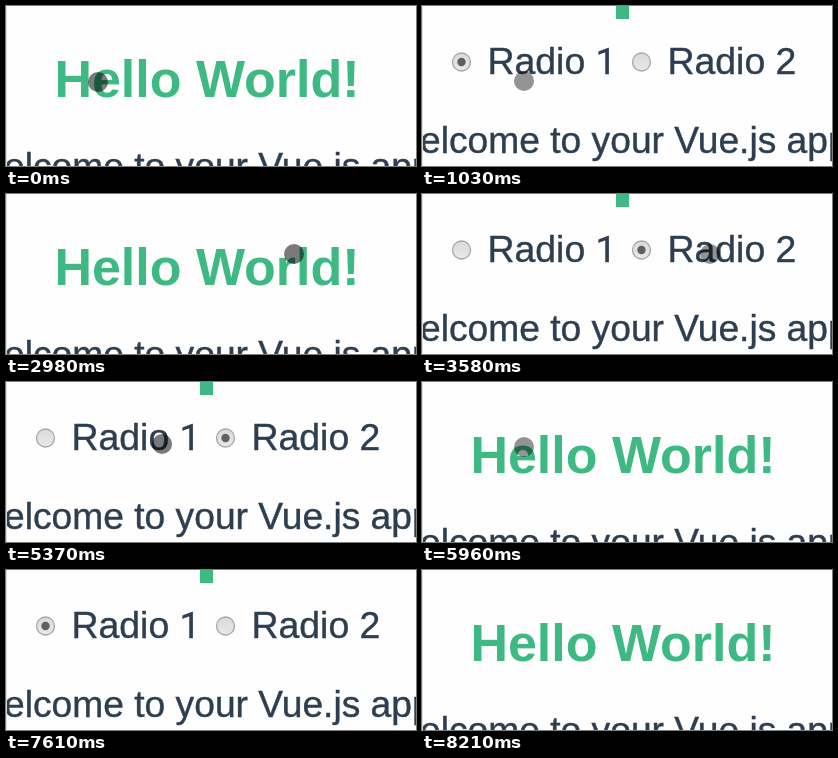
Write an HTML page that moves like this. It is 410x160 px and loops after 8630 ms.

```html
<!DOCTYPE html>
<html lang="en">
<head>
<meta charset="utf-8">
<title>Radio toggle</title>
<style>
  html, body { margin: 0; width: 100%; height: 100%; overflow: hidden; background: #fefefe; }
  svg { display: block; width: 410px; height: 160px; }
  text { font-family: "Liberation Sans", Arial, sans-serif; font-size: 37.4px; fill: #2c3e50; stroke: #2c3e50; stroke-width: .4px; }
  .title { font-size: 52px; font-weight: bold; fill: #3eb983; stroke: none; }
  .one { font-family: Roboto, sans-serif; }
  .mid { text-anchor: middle; }
  #welcome { font-size: 37.2px; }
</style>
</head>
<body>
<svg viewBox="0 0 410 160">
  <defs>
    <linearGradient id="face" x1="0" y1="0" x2="0" y2="1">
      <stop offset="0" stop-color="#dadada"/>
      <stop offset="1" stop-color="#e8e8e8"/>
    </linearGradient>
  </defs>
  <rect width="410" height="160" fill="#fefefe"/>
  <text id="title" class="title mid" x="201" y="91">Hello World!</text>
  <g id="form">
    <rect x="194" width="13" height="13" fill="#3eb983"/>
    <g fill="url(#face)" stroke="#a6a6a6" stroke-width="1.3">
      <circle cx="39.5" cy="56" r="9"/>
      <circle cx="219.5" cy="56" r="9"/>
    </g>
    <circle id="dot" cy="56" r="4.2" fill="#606060"/>
    <text x="65.5" y="67.5">Radio <tspan class="one">1</tspan></text>
    <text x="245.5" y="67.5">Radio 2</text>
  </g>
  <text id="welcome" class="mid" x="200.3">Welcome to your Vue.js app!</text>
  <rect width="1" height="160" fill="#dcdcdc"/>
  <circle id="pointer" r="10"/>
</svg>
<script>
const LOOP = 8630, STEP = 148.8, GONE = 7610;
const $ = id => document.getElementById(id);
const [title, form, dot, welcome, pointer] =
  ['title', 'form', 'dot', 'welcome', 'pointer'].map($);

// when the radios are shown
const edits = [
  { from: 1030, to: 2980 },
  { from: 3430, to: 5820 },
  { from: 6260, to: 8210 }
];

// pointer stops: time, x, y
const stops = [
  [0, 92, 76], [590, 102, 75],
  [1480, 102, 75], [2080, 264, 56], [2530, 288, 60],
  [4330, 288, 60], [5370, 156, 62], [5820, 102, 65],
  [7160, 102, 65], [7460, 336, 95]
];

const within = (t, a, b) => t >= a && t < b;
const ease = p => p * p * (3 - 2 * p);
const show = (el, on) => { el.style.display = on ? '' : 'none'; };

function pointerAt(t) {
  const i = stops.findIndex(s => s[0] > t);
  if (i < 0) return stops[stops.length - 1].slice(1);
  const [t0, x0, y0] = stops[i - 1], [t1, x1, y1] = stops[i];
  const p = ease((t - t0) / (t1 - t0));
  return [x0 + (x1 - x0) * p, y0 + (y1 - y0) * p];
}

function draw(t) {
  const open = edits.some(e => within(t, e.from, e.to));
  const second = within(t, edits[0].to, edits[1].to);
  show(title, !open);
  show(form, open);
  dot.setAttribute('cx', second ? 219.5 : 39.5);
  welcome.setAttribute('y', open ? 147 : 172.5);

  const [x, y] = pointerAt(Math.floor((t + 6) / STEP) * STEP);
  const pressed = edits.some(e => within(t, e.from - 300, e.from + 300));
  pointer.setAttribute('cx', x);
  pointer.setAttribute('cy', y);
  pointer.setAttribute('opacity', pressed ? 0.42 : 0.52);
  show(pointer, t < GONE);
}

function frame() {
  draw(performance.now() % LOOP);
  requestAnimationFrame(frame);
}
draw(0);
requestAnimationFrame(frame);
</script>
</body>
</html>
```
